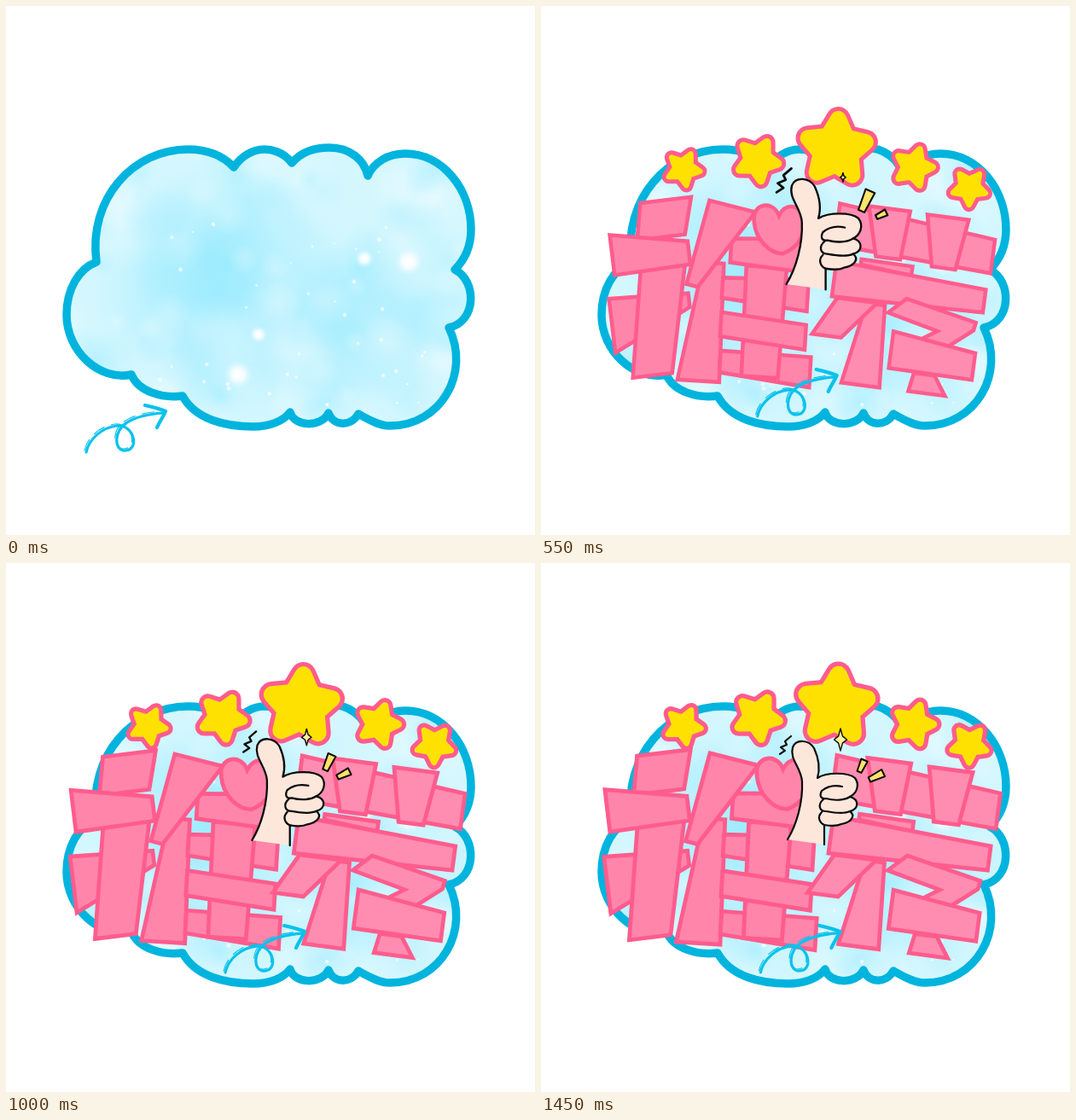
Recreate the animation shown at these times as an HTML page with a canvas. Size 620 by 620 pixels, loop 1500 ms.

```html
<!DOCTYPE html>
<html lang="zh">
<head>
<meta charset="utf-8">
<title>推荐</title>
<style>
html, body { margin: 0; width: 100%; height: 100%; overflow: hidden; background: #fff; }
canvas { display: block; }
</style>
</head>
<body>
<canvas id="stage" width="620" height="620"></canvas>
<script>
const SIZE = 620, LOOP = 1500, STEP = 50, ENTER = 200, TAU = 2 * Math.PI;
const PINK = '#ff5c8d', YELLOW = '#ffe100', INK = '#0a0a0a', BRUSH = '#08c2ec';
const CYAN = '140,232,254', WHITE = '255,255,255';
const stage = document.getElementById('stage').getContext('2d');

const cloudPath = new Path2D(`M267 189 C252 173 232 168 213 168 C150 168 96 225 106 300
  C85 308 71 332 71 362 C71 405 110 440 147 432 C155 452 183 460 207 457
  C222 485 258 493 290 493 C308 493 325 487 333 476 C338 494 370 494 378 477
  C383 492 404 494 413 478 C430 488 440 492 450 492 C510 492 545 430 519 377
  C552 370 552 322 526 309 C542 293 545 275 545 262 C545 215 512 173 468 173
  C448 173 431 183 424 199 C420 180 403 166 379 166 C360 166 345 172 335 184
  C325 170 309 168 303 168 C288 168 275 177 267 189 Z`);

// A paper strip runs between two end midpoints; its ends are cut along axes turned by `tilt`.
function strip(tilt, x0, y0, w0, x1, y1, w1) {
  const upright = Math.abs(y1 - y0) > Math.abs(x1 - x0);
  const ux = (upright ? Math.cos(tilt) : -Math.sin(tilt)) / 2;
  const uy = (upright ? Math.sin(tilt) : Math.cos(tilt)) / 2;
  const path = new Path2D();
  path.moveTo(x0 - ux * w0, y0 - uy * w0);
  path.lineTo(x0 + ux * w0, y0 + uy * w0);
  path.lineTo(x1 + ux * w1, y1 + uy * w1);
  path.lineTo(x1 - ux * w1, y1 - uy * w1);
  path.closePath();
  return path;
}
const strips = (tilt, ...rows) => rows.map(row => strip(tilt, ...row));

const pushChar = [
  ...strips(-.12,
    [142, 218, 66, 136, 266, 62], [73, 380, 70, 172, 347, 18],
    [139, 297, 58, 125, 444, 51], [73, 289, 52, 172, 286, 30]),
  ...strips(.06,
    [204, 299, 26, 184, 451, 54], [215, 331, 26, 325, 341, 41], [212, 426, 28, 328, 440, 39],
    [272, 304, 52, 263, 446, 47], [226, 283, 31, 327, 290, 44], [213, 378, 31, 322, 395, 32]),
  ...strips(.25, [228, 226, 61, 176, 328, 15]),
  new Path2D(`M288 238 C280 217 252 222 256 247 C258 268 275 287 293 287
    C312 280 324 262 319 241 C314 222 296 222 288 238Z`)
];

const praiseChar = [
  ...strips(.13,
    [340, 246, 54, 542, 288, 44], [408, 226, 54, 406, 290, 32], [484, 237, 54, 478, 303, 31],
    [371, 295, 7, 437, 307, 12], [390, 350, 24, 370, 455, 50],
    [366, 345, 52, 326, 391, 38], [336, 317, 46, 531, 346, 30]),
  new Path2D('M430 343 L520 374 L517 384 L476 410 L436 402 L470 385 L406 361Z'),
  ...strips(.13, [453, 441, 27, 456, 466, 48], [410, 409, 48, 517, 431, 35])
];

// x, y, radius, tilt in degrees
const stars = [
  [167, 191, 30.5, 26], [254, 181, 37, 27], [346, 168, 55, 4], [437, 189, 34, 18], [502, 213, 31, 37]
];

const arrowLine = new Path2D(`M94 523 C97 508 112 494 130 492 C150 490 157 520 140 521
  C126 522 126 497 142 488 C155 480 170 478 184 477`);
const arrowHead = new Path2D('M163 468 C172 470 180 472 187 475 C184 482 180 487 177 494');

const handPath = new Path2D(`M289 324 C300 306 307 280 306 256 C305 240 291 230 295 216
  C299 206 314 207 320 217 C326 230 327 242 324 252 C335 245 360 245 368 252
  C374 260 370 270 362 274 C373 277 373 288 362 291 C369 296 364 304 352 306
  C346 309 338 308 332 307 L332 330`);
const fingerLines = new Path2D(`M353 262 C344 260 335 262 329 267 C326 273 328 277 334 276
  C345 279 356 278 362 274 M331 277 C324 283 326 291 334 291 C345 293 356 294 362 291
  M329 292 C323 298 327 305 332 307`);
const squiggle = new Path2D('M6 -11 L-1 -5 L1 -1 L-6 2 L-1 6 L-7 10');

const mix = (a, b, k) => a + (b - a) * k;

// Grows in during ENTER, then rings around `rest` like a damped spring.
function spring(t, rest, swing, peak, period, decay) {
  const ring = Math.exp((peak - t) / decay) * Math.cos(TAU * (t - peak) / period);
  return t < ENTER ? Math.sin(TAU / 4 * t / ENTER) : Math.min(1, rest + swing * ring);
}

function backOut(u, overshoot = 2) {
  const v = Math.min(1, u) - 1;
  return u <= 0 ? 0 : 1 + (overshoot + 1) * v ** 3 + overshoot * v ** 2;
}

function scaled(ctx, x, y, scale, draw) {
  ctx.save();
  ctx.translate(x, y);
  ctx.scale(scale, scale);
  ctx.translate(-x, -y);
  draw();
  ctx.restore();
}

function outline(ctx, path, color, width) {
  ctx.strokeStyle = color;
  ctx.lineWidth = width;
  ctx.stroke(path);
}

function filled(ctx, path, fill, color, width) {
  ctx.fillStyle = fill;
  ctx.fill(path);
  outline(ctx, path, color, width);
}

function glow(ctx, x, y, r, rgb, alpha) {
  const g = ctx.createRadialGradient(x, y, 0, x, y, r);
  g.addColorStop(0, `rgba(${rgb},${alpha})`);
  g.addColorStop(.45, `rgba(${rgb},${alpha * .6})`);
  g.addColorStop(1, `rgba(${rgb},0)`);
  ctx.fillStyle = g;
  ctx.fillRect(x - r, y - r, 2 * r, 2 * r);
}

function paintCloud() {
  const canvas = document.createElement('canvas');
  canvas.width = canvas.height = SIZE;
  const ctx = canvas.getContext('2d');
  let seed = 7;
  const random = () => (seed = seed * 16807 % 2147483647) / 2147483647;
  ctx.save();
  ctx.clip(cloudPath);
  ctx.fillStyle = '#d4f7fe';
  ctx.fillRect(0, 0, SIZE, SIZE);
  glow(ctx, 250, 330, 150, CYAN, .7);
  glow(ctx, 410, 380, 120, CYAN, .5);
  for (let i = 0; i < 120; i++) {
    glow(ctx, 75 + random() * 470, 170 + random() * 320, 12 + random() * 34, i % 2 ? WHITE : CYAN, .22);
  }
  for (const [x, y, r] of [[272, 432, 16], [296, 385, 10], [472, 300, 16], [420, 296, 11]]) {
    glow(ctx, x, y, r, WHITE, 1);
    glow(ctx, x, y, r * .7, WHITE, 1);
  }
  for (let i = 0; i < 40; i++) {
    glow(ctx, 180 + random() * 320, 250 + random() * 225, 1.5 + random() * 2, WHITE, 1);
  }
  ctx.restore();
  ctx.lineJoin = 'round';
  outline(ctx, cloudPath, '#00b4de', 9.5);
  return canvas;
}

function drawStar(ctx, x, y, radius, tilt) {
  const path = new Path2D(), k = radius / 55;
  for (let i = 0; i < 10; i++) {
    const a = (tilt + i * 36) * TAU / 360, r = k * (i % 2 ? 20 : 39);
    path.lineTo(x + r * Math.sin(a), y - r * Math.cos(a));
  }
  path.closePath();
  ctx.lineJoin = 'round';
  outline(ctx, path, PINK, 32 * k);
  filled(ctx, path, YELLOW, YELLOW, 32 * k - 11);
}

function drawWord(ctx, shapes, fill) {
  ctx.lineJoin = 'miter';
  for (const shape of shapes) filled(ctx, shape, fill, PINK, 5);
}

function drawArrow(ctx, t, late) {
  const dx = 167 * Math.min(1, t / ENTER) - (t < ENTER ? 0 : 75 * (1 - late));
  ctx.save();
  ctx.translate(dx, -dx * 44 / 167);
  ctx.lineCap = ctx.lineJoin = 'round';
  outline(ctx, arrowLine, BRUSH, 3.2);
  outline(ctx, arrowHead, BRUSH, 4.2);
  ctx.translate(-2, -2);
  ctx.setLineDash([14, 9]);
  outline(ctx, arrowLine, BRUSH, 1.2);
  ctx.restore();
}

function drawRay(ctx, x, y, degrees, width, length) {
  ctx.save();
  ctx.translate(x, y);
  ctx.rotate(degrees * TAU / 360);
  filled(ctx, strip(0, 0, -length / 2, width, 0, length / 2, width * .65), '#ffe36a', INK, 2);
  ctx.restore();
}

function drawSparkle(ctx, x, y, w, h) {
  const path = new Path2D();
  for (let i = 0; i < 8; i++) {
    const a = i * TAU / 8, r = i % 2 ? .45 : 1;
    path.lineTo(x + w * r * Math.cos(a), y + h * r * Math.sin(a));
  }
  path.closePath();
  filled(ctx, path, '#fff0a0', INK, 1.4);
}

function drawHand(ctx, beat) {
  ctx.lineCap = ctx.lineJoin = 'round';
  filled(ctx, handPath, '#fde7da', INK, 2.2);
  outline(ctx, fingerLines, INK, 2.2);
  drawSparkle(ctx, 351, 207, mix(7.5, 3, beat), mix(13, 5, beat));
  drawRay(ctx, 376, mix(238, 233, beat), 24, mix(8, 11, beat), mix(15, 24, beat));
  drawRay(ctx, 393, mix(250, 248, beat), 64, mix(9, 7, beat), mix(18, 12, beat));
  scaled(ctx, 287, mix(214, 211, beat), mix(1, 1.25, beat), () => {
    ctx.translate(287, mix(214, 211, beat));
    outline(ctx, squiggle, INK, 2.1);
  });
}

const cloud = paintCloud();

function drawScene(ctx, t) {
  ctx.fillStyle = '#fff';
  ctx.fillRect(0, 0, SIZE, SIZE);
  ctx.drawImage(cloud, 0, 0);
  const word = spring(t, .946, .055, 230, 620, 800);
  const late = spring(t, .945, .08, 300, 570, 450);
  const beat = (1 + Math.cos(TAU * (t - 560) / 600)) / 2;
  const hand = backOut((t - ENTER) / 350) * (1 + .07 * beat);
  if (word > 0) {
    scaled(ctx, 188, 322, word, () => drawWord(ctx, pushChar, '#ff85ab'));
    scaled(ctx, 414, 345, late, () => drawWord(ctx, praiseChar, '#ff8db1'));
    for (const star of stars) {
      scaled(ctx, star[0], star[1], word, () => drawStar(ctx, ...star));
    }
  }
  drawArrow(ctx, t, late);
  if (hand > 0) scaled(ctx, 309, 296, hand, () => drawHand(ctx, beat));
}

const start = performance.now();
function tick() {
  const t = (performance.now() - start) % LOOP;
  drawScene(stage, Math.floor(t / STEP) * STEP);
  requestAnimationFrame(tick);
}
tick();
</script>
</body>
</html>
```
